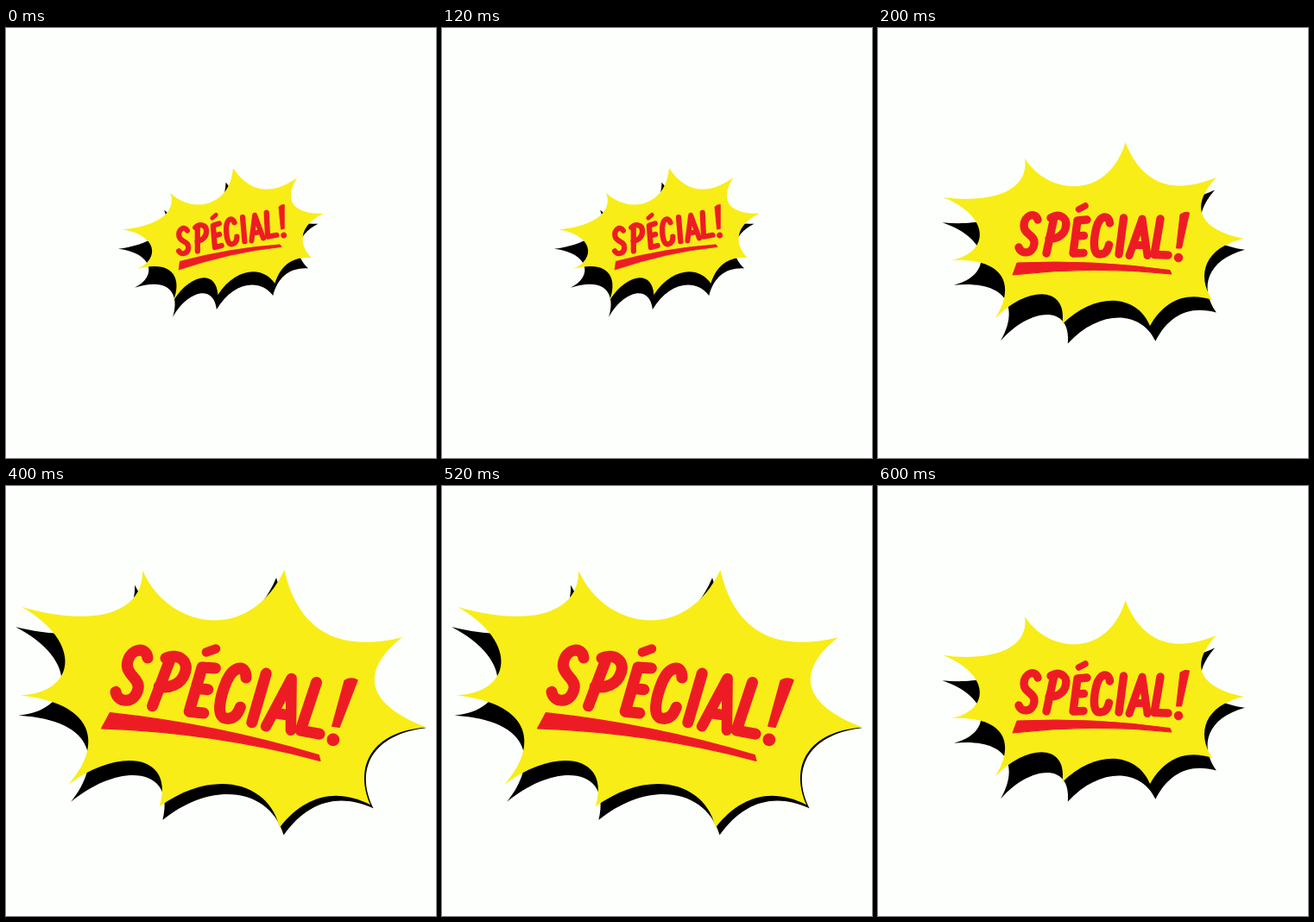
An HTML page for the animation above (0.8 s loop, 498 by 498 pixels).

```html
<!DOCTYPE html>
<html lang="fr">
<head>
<meta charset="utf-8">
<title>Spécial !</title>
<style>
  html, body { margin: 0; width: 100%; height: 100%; overflow: hidden; background: #fdfffc; }
  svg { display: block; width: 100%; height: 100%; }
  .ink { fill: none; stroke: #ed1c24; stroke-width: 9.4; stroke-linejoin: round; stroke-linecap: round; }
  .fill { fill: #ed1c24; stroke: #ed1c24; stroke-width: 1; stroke-linejoin: round; }
</style>
</head>
<body>
<svg viewBox="0 0 498 498" role="img" aria-label="SPÉCIAL!">
  <defs>
    <path id="burst" d="M170,151 C197,194 266,200 286.5,132.5 C306,182 342.5,193.5 392,173
      C363.5,203 366,232 423.5,244 C379,254 368,285 387,315 C357,305 332,315 315,345
      C300,308 252,304.6 213.5,343 C220,297 172,299 136,336 C158,302 151,266 85,269
      C130,260 131,218 75,196 C125,203 176,192 170,151 Z"/>
  </defs>
  <g id="shadow"><use href="#burst"/></g>
  <g id="badge">
    <use href="#burst" fill="#f8ed16"/>
    <g class="ink">
      <path d="M185,222 C182,212 169,217 169,229 C169,239 182,240 181,249 C180,262 166,263 163,254"/>
      <path d="M204,219 L195,261 M200,220 C209,214 220,219 217.5,230 C216,240 206,245 198,244"/>
      <path d="M242,222 L231,223 L226,261 L238,260.5 M229,241 L238.5,240.5"/>
      <path d="M232.5,210 L240,206" stroke-width="7.5"/>
      <path d="M268.5,226 C267,215 257,217 253,231 C249,247 249,262 257,262 C262,262 266,259 267.5,251"/>
      <path d="M284.5,220 L279,262"/>
      <path d="M291,263.5 L306,221 L312,263.5 M298,251.5 L309,251.5" stroke-width="9"/>
      <path d="M327,221 L320,262.5 L336,263"/>
    </g>
    <g class="fill">
      <path d="M350,216 Q355,212 360.5,214 L351.5,255 L345.5,255 Z"/>
      <circle cx="348" cy="266" r="4.8"/>
      <path d="M161,272 Q250,268 338,280.5 L340,285 Q250,275 156,286 Z"/>
    </g>
  </g>
</svg>
<script>
  const STEP = 200;
  const SHADOW_TILT = -2.7;
  const small = { x: 252, y: 224, turn: -12.3, size: 0.663, dx: -5.5, dy: 17 };
  const middle = { x: 250.5, y: 220, turn: 0, size: 1, dx: 0.5, dy: 21 };
  const large = { x: 254.5, y: 210, turn: 8.7, size: 1.391, dx: -4, dy: 12 };
  const poses = [small, middle, large, middle];

  const badge = document.getElementById("badge");
  const shadow = document.getElementById("shadow");

  function place(node, x, y, turn, size) {
    node.setAttribute("transform",
      `translate(${x} ${y}) rotate(${turn}) scale(${size}) translate(-250.5 -220)`);
  }

  // The sign snaps from pose to pose without easing.
  function draw(time) {
    const { x, y, turn, size, dx, dy } = poses[Math.floor(time / STEP) % poses.length];
    place(badge, x, y, turn, size);
    place(shadow, x + dx, y + dy, turn + SHADOW_TILT, size);
  }

  function tick() {
    draw(performance.now());
    requestAnimationFrame(tick);
  }
  tick();
</script>
</body>
</html>
```
